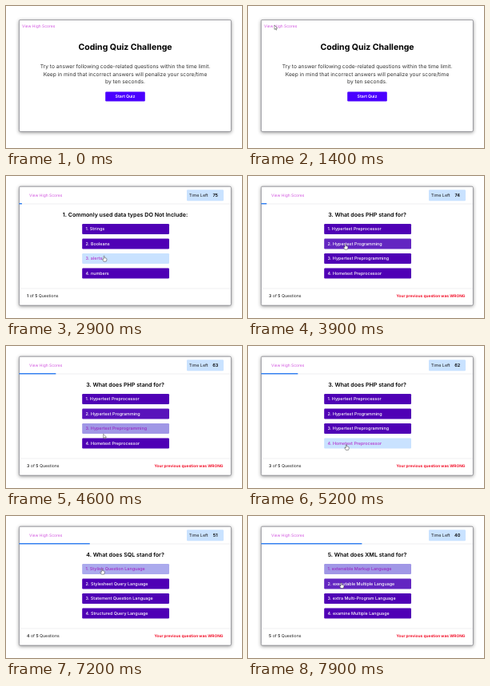
These frames come from a looping animation (295x178 px, 8000 ms). An HTML page:

```html
<!DOCTYPE html>
<html lang="en">
<head>
<meta charset="utf-8">
<title>Coding Quiz</title>
<style>
  html, body { margin: 0; width: 100%; height: 100%; overflow: hidden; background: #fff; }
  svg { display: block; width: 100%; height: 100%; font-family: Inter, "Open Sans", sans-serif; text-rendering: geometricPrecision; }
  .card { fill: #fff; stroke: #85858b; stroke-width: .8; filter: drop-shadow(0 1px 2px rgba(0, 0, 0, .42)); }
  .link { font-size: 4.95px; fill: #d052de; }
  .mid { text-anchor: middle; }
  .b { font-weight: 600; }
</style>
</head>
<body>
<svg viewBox="0 0 295 178">
  <rect width="295" height="178" fill="#fff"/>
  <g id="intro">
    <rect class="card" x="16.4" y="17.4" width="265" height="140" rx="1.5"/>
    <text class="link" x="20" y="26.8">View High Scores</text>
    <text class="mid" x="149" y="54.8" font-size="10.5" font-weight="700">Coding Quiz Challenge</text>
    <g class="mid" font-size="6.66" fill="#333">
      <text x="149" y="78.3">Try to answer following code-related questions within the time limit.</text>
      <text x="149" y="87.8">Keep in mind that incorrect answers will penalize your score/time</text>
      <text x="149" y="97.3">by ten seconds.</text>
    </g>
    <rect id="start" x="124.2" y="107.5" width="49.6" height="12" rx="1.2"/>
    <text class="mid b" x="149" y="115.4" font-size="5.15" fill="#fff">Start Quiz</text>
  </g>
  <g id="quiz">
    <rect class="card" x="16.4" y="13.2" width="265" height="149" rx="1.5"/>
    <text class="link" x="29" y="26.3">View High Scores</text>
    <rect x="226" y="17.3" width="46" height="14" rx="1.2" fill="#c9e2ff"/>
    <text x="228.7" y="26.2" font-size="5.4" fill="#222">Time Left</text>
    <text id="clock" class="mid b" x="261.7" y="26.2" font-size="5.6"></text>
    <path d="M16.8 35H281M16.8 141H281" stroke="#e4e4e8" stroke-width=".6"/>
    <rect id="bar" x="16.4" y="34" height="1.4" fill="#2c7cf0"/>
    <text id="ask" class="mid b" x="149" y="50.5" font-size="7.1"></text>
    <g id="list" font-size="5.4" font-weight="500"></g>
    <text x="26" y="152.2" font-size="5.2" fill="#222"><tspan id="num" class="b"></tspan> of <tspan class="b">5</tspan> Questions</text>
    <text id="note" x="271.5" y="152" font-size="4.87" font-weight="700" fill="#f2122b" text-anchor="end">Your previous question was WRONG</text>
  </g>
  <g id="cursor" stroke="#222" stroke-width=".45" stroke-linejoin="round" fill="#fff">
    <path id="arrow" d="M0 0V5.4L1.3 4.3L2.1 6.2L2.9 5.8L2.1 4L3.9 3.9Z"/>
    <path id="hand" transform="translate(.6 .3)" d="M-.6 .3Q0 -.5 .6 .3V2.4L1.6 2.5L2.6 2.8L3.3 3.3V5L2.6 6.8H-.6L-2.2 4.2Q-2 3.3 -1.2 3.8L-.6 4.4Z"/>
  </g>
</svg>
<script>
const LOOP = 8000, FADE = 300;
const $ = id => document.getElementById(id);
const clamp = v => Math.max(0, Math.min(1, v));
const lerp = (a, b, k) => a + (b - a) * k;
const ease = k => k < .5 ? 2 * k * k : 1 - 2 * (1 - k) ** 2;

const quizzes = [
  { at: 2200, ask: 'Commonly used data types DO Not Include:',
    opts: ['Strings', 'Booleans', 'alerts', 'numbers'] },
  { at: 3200, ask: 'What does HTML stand for?',
    opts: ['Hypertext Markup Language', 'Hypertext Multiple Language', 'Hypertext Machine Language', 'Hometext Markup Language'] },
  { at: 3850, ask: 'What does PHP stand for?',
    opts: ['Hypertext Preprocessor', 'Hypertext Programming', 'Hypertext Preprogramming', 'Hometext Preprocessor'] },
  { at: 5500, ask: 'What does SQL stand for?',
    opts: ['Stylish Question Language', 'Stylesheet Query Language', 'Statement Question Language', 'Structured Query Language'] },
  { at: 7300, ask: 'What does XML stand for?',
    opts: ['extensible Markup Language', 'executable Multiple Language', 'extra Multi-Program Language', 'examine Multiple Language'] }
];

// time, x, y of the pointer tip
const path = [
  [500, 193, 121], [900, 22, 24], [1100, 33, 24], [1400, 33, 24], [1800, 183, 104],
  [2200, 138, 111], [2300, 136, 110], [2500, 130, 105], [2900, 122, 100], [3200, 122, 100],
  [3600, 121, 86], [3900, 121, 85], [4200, 121, 85], [4800, 122, 123], [5500, 122.5, 123.5],
  [5750, 119, 66], [6100, 119.5, 65.5], [6300, 119.5, 65.5], [6700, 124, 120], [7000, 120, 66],
  [7600, 118, 66], [7700, 117, 69], [7800, 116.5, 73.5], [7900, 116, 83.5]
];

// start time and value
const clock = [[0, 75], [3200, 74], [4200, 63], [5200, 62], [6200, 51], [7500, 40]];
const goals = [[2400, 74], [3820, 62], [5200, 61], [5450, 51], [6200, 50], [7550, 39]];

const rowY = i => 60 + 18.5 * i;
const latest = (list, t) => list.filter(e => e[0] <= t).pop();

function pointer(t) {
  const i = path.findIndex(p => p[0] > t);
  if (i < 0) return path[path.length - 1].slice(1);
  if (i === 0) return path[0].slice(1);
  const a = path[i - 1], b = path[i], k = (t - a[0]) / (b[0] - a[0]);
  return [lerp(a[1], b[1], k), lerp(a[2], b[2], k)];
}

function inside([x, y], left, top, w, h) {
  return x >= left && x <= left + w && y >= top && y <= top + h;
}

const overRow = (p, i) => inside(p, 95, rowY(i), 109, 13);

// hover level builds up and decays since the question appeared
function hover(i, from, t) {
  const step = 25;
  let level = 0;
  for (let s = from; s < t; s += step)
    level = clamp(level + (overRow(pointer(s), i) ? step : -step) / FADE);
  return level;
}

function mix(a, b, k) {
  return `rgb(${a.map((v, i) => Math.round(lerp(v, b[i], k)))})`;
}

function barWidth(t) {
  let sec = 75;
  for (const [at, goal] of goals) sec = lerp(sec, goal, ease(clamp((t - at) / 400)));
  return 265 * (75 - sec) / 75;
}

function zoom(el, scale, opacity) {
  el.setAttribute('transform', `translate(148.9 87.7) scale(${scale}) translate(-148.9 -87.7)`);
  el.setAttribute('opacity', opacity);
}

const show = (el, on) => el.setAttribute('display', on ? 'inline' : 'none');

function add(tag, attrs) {
  const el = document.createElementNS('http://www.w3.org/2000/svg', tag);
  for (const k in attrs) el.setAttribute(k, attrs[k]);
  return $('list').appendChild(el);
}

const rows = [0, 1, 2, 3].map(i => ({
  box: add('rect', { x: 95.2, y: rowY(i), width: 108.8, height: 13, rx: 1.2 }),
  label: add('text', { x: 99.6, y: rowY(i) + 8.3 })
}));

function drawQuiz(t) {
  const n = Math.max(0, quizzes.filter(q => q.at <= t).length - 1), quiz = quizzes[n];
  $('ask').textContent = `${n + 1}. ${quiz.ask}`;
  $('num').textContent = n + 1;
  $('clock').textContent = latest(clock, t)[1];
  $('bar').setAttribute('width', barWidth(t));
  show($('note'), n > 1);
  rows.forEach(({ box, label }, i) => {
    const k = hover(i, n ? quiz.at : 2400, t);
    label.textContent = `${i + 1}. ${quiz.opts[i]}`;
    box.setAttribute('fill', mix([79, 0, 181], [201, 226, 255], k));
    // the label turns dark while the box is still getting lighter
    label.setAttribute('fill', k < .4 ? '#fff' : mix([90, 20, 170], [180, 50, 205], k));
  });
}

function draw(ms) {
  const t = Math.floor(ms % LOOP / 100) * 100;
  const p = clamp((t - 2200) / 200), tip = pointer(t);
  const onStart = t < 2400 && inside(tip, 124.2, 107.5, 49.6, 12);
  zoom($('intro'), 1 - .08 * p, 1 - .75 * p);
  zoom($('quiz'), .9 + .1 * p, p);
  show($('intro'), p < 1);
  show($('quiz'), p > 0);
  $('start').setAttribute('fill', onStart ? '#6a2cff' : '#4a00ff');
  if (p > 0) drawQuiz(t);

  const hand = onStart || (p === 1 && rows.some((_, i) => overRow(tip, i)));
  show($('cursor'), t >= 500);
  show($('hand'), hand);
  show($('arrow'), !hand);
  $('cursor').setAttribute('transform', `translate(${tip})`);
}

const begin = performance.now();
function tick() {
  draw(performance.now() - begin);
  requestAnimationFrame(tick);
}
tick();
</script>
</body>
</html>
```
